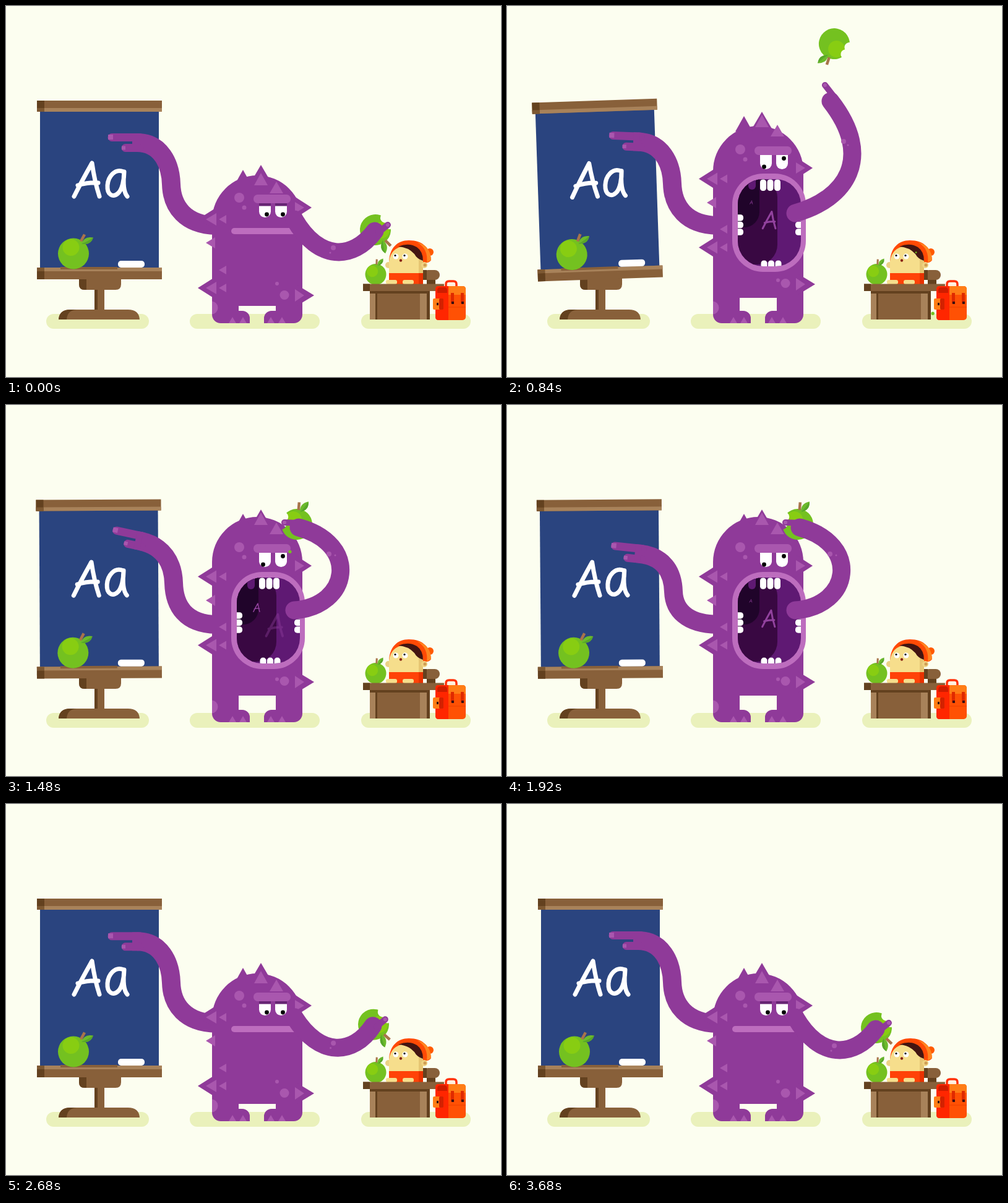
An HTML page for the animation above (3.72 s loop, 800 by 600 pixels).

```html
<!DOCTYPE html>
<html lang="en">
<head>
<meta charset="utf-8">
<title>Monster teacher</title>
<style>
html, body { margin: 0; width: 100%; height: 100%; overflow: hidden; background: #fcfef0; }
svg { display: block; width: 800px; height: 600px; }
.skin { fill: #8f3a99; }
.spot { fill: #a957ae; }
.limb { fill: none; stroke: #8f3a99; stroke-linecap: round; }
.glyph { fill: none; stroke-linecap: round; stroke-linejoin: round; }
.wood { fill: #88603a; }
.pale { fill: #a8825a; }
.dark { fill: #63411f; }
</style>
</head>
<body>
<svg viewBox="0 0 800 600">
<defs>
  <path id="A" class="glyph" d="M-21 27Q-8 1 8 -27Q12 2 20 27M-15 9Q2 4 18 5"/>
  <g id="fruit">
    <path d="M12 -20L18 -31" stroke="#a8744a" stroke-width="4.5"/>
    <path d="M13 -16Q17 -29 32 -26Q28 -13 13 -16Z" fill="#6cba2c"/>
    <path d="M13 -16Q22 -19 32 -26Q28 -13 13 -16Z" fill="#57a62a"/>
  </g>
  <g id="apple">
    <circle r="25" fill="#74c120"/>
    <circle cx="-4" cy="-10" r="13.5" fill="#88cd12"/>
    <use href="#fruit"/>
  </g>
  <mask id="bite">
    <rect x="-40" y="-40" width="80" height="80" fill="#fff"/>
    <circle cx="-23" cy="-10" r="8"/><circle cx="-15" cy="-20" r="8"/>
    <circle cx="-26" cy="-20" r="9"/>
  </mask>
  <clipPath id="gape"><rect id="hole" x="373" width="102"/></clipPath>
  <clipPath id="side"><rect x="333" y="470" width="20" height="40"/></clipPath>
</defs>

<g fill="#eaf1bb">
  <rect x="65" y="498" width="166" height="24" rx="12"/>
  <rect x="297" y="498" width="210" height="24" rx="12"/>
  <rect x="574" y="498" width="177" height="24" rx="12"/>
</g>

<!-- blackboard -->
<path class="wood" d="M118 440H186V450Q186 459 177 459H127Q118 459 118 450Z"/>
<path class="dark" d="M118 440H130V459H127Q118 459 118 450Z"/>
<rect class="wood" x="143" y="459" width="16" height="33"/>
<rect class="dark" x="143" y="459" width="5" height="33"/>
<path class="wood" d="M85 507Q86 491 104 491H197Q215 491 216 507Z"/>
<path class="dark" d="M85 507Q86 491 104 491H114Q99 492 98 507Z"/>
<g id="board">
  <rect x="55" y="168" width="192" height="257" fill="#2a447f"/>
  <rect class="wood" x="50" y="153" width="202" height="18"/>
  <rect class="pale" x="50" y="165" width="202" height="6"/>
  <path class="dark" d="M50 153H62V171H50Z"/>
  <path d="M50 165H62V171H50Z" fill="#7d5832"/>
  <rect class="wood" x="50" y="423" width="202" height="19"/>
  <rect class="pale" x="50" y="423" width="202" height="6"/>
  <path d="M50 423H62V429H50Z" fill="#7d5832"/>
  <path class="dark" d="M50 429H62V442H50Z"/>
  <rect class="wood" x="88" y="422" width="92" height="4"/>
  <rect x="181" y="412" width="43" height="11" rx="5" fill="#fff"/>
  <g stroke="#fff" stroke-width="7" aria-label="Aa">
    <use href="#A" x="131" y="281"/>
    <path class="glyph" d="M190 268C176 262 165 276 164 290C163 306 173 310 181 303C188 297 191 280 191 268C189 287 190 301 196 308"/>
  </g>
  <use id="shelf" href="#apple"/>
</g>

<!-- desk, pupil and bag -->
<path d="M680 440H694V455H680Z" class="dark"/>
<rect class="wood" x="674" y="427" width="27" height="16" rx="8"/>
<path class="dark" d="M674 427H680V443H674Z"/>
<circle cx="685" cy="398" r="6" fill="#ff5a00"/>
<path d="M619 416C619 391 633 379 651 379C674 379 686 392 687 411Q684 416 677 415Z" fill="#ff4a05"/>
<path d="M664 382C680 386 687 397 687 411L680 415C682 401 677 389 664 382Z" fill="#ff8620"/>
<circle cx="618" cy="419" r="5" fill="#ecd184"/>
<path d="M619 433V413Q622 391 644 388Q666 388 674 412V433Z" fill="#f6de8c"/>
<path d="M667 409H674V433H667Z" fill="#e6c673"/>
<path d="M634 389Q651 382 664 390Q674 397 674 412Q664 409 660 401Q650 390 634 389Z" fill="#431511"/>
<circle cx="676" cy="419" r="5" fill="#f0d382"/><circle cx="677" cy="419" r="2.5" fill="#cf9d55"/>
<g fill="#fff"><circle cx="630" cy="405" r="4.5"/><circle cx="645" cy="405" r="4.5"/></g>
<circle cx="629" cy="403.500" r="1.600"/><circle cx="644" cy="403.500" r="1.600"/>
<circle cx="638" cy="411.500" r="2.200" fill="#8a2415"/>
<path d="M619 432H674V450H619Z" fill="#ff4208"/>
<path d="M667 432H674V450H667Z" fill="#e93200"/>
<rect x="614" y="443" width="18" height="7" rx="3" fill="#f6de8c"/>
<rect x="641" y="443" width="18" height="7" rx="3" fill="#f6de8c"/>
<use href="#apple" transform="translate(597.500 434) rotate(-26) scale(.68)"/>
<path class="wood" d="M588 460H685V507H588Z"/>
<path class="pale" d="M588 460H597V507H588ZM669 460H680V507H669Z"/>
<path class="dark" d="M597 460H600V507H597ZM680 460H685V507H680ZM588 460H680V465H588Z"/>
<rect class="wood" x="577" y="449.500" width="131" height="11.500"/>
<rect class="dark" x="577" y="449.500" width="11" height="11.500"/>
<path d="M711 455V450Q711 445 716 445H723Q728 445 728 450V455" fill="#fff0e0" stroke="#ff3008" stroke-width="3.500"/>
<rect x="694" y="453" width="49" height="55" rx="5" fill="#ff5104"/>
<path d="M715 453H738Q743 453 743 458V467H715Z" fill="#ff7d16"/>
<path d="M699 453H715V508H699Q694 508 694 503V458Q694 453 699 453Z" fill="#ff2600"/>
<path d="M697 464V460Q697 455 702 455H708Q713 455 713 460V464Z" fill="#ce1d00"/>
<rect x="690" y="473" width="12" height="18" rx="2" fill="#ff7d16"/>
<rect x="700" y="473" width="7" height="18" rx="2" fill="#d32100"/>
<path d="M719 464H724V481H719ZM735 464H740V481H735Z" fill="#df2a00"/>
<path d="M720 478H724V482H720ZM736 478H740V482H736ZM696 480H699V484H696Z" fill="#3a1010"/>
<path d="M715 487H743" stroke="#f44400" stroke-width="1.500"/>

<!-- monster -->
<path id="armL" class="limb" stroke-width="30" style="stroke-linecap:butt"/>
<g id="handL">
  <path class="limb" stroke-width="13" d="M-41 -8.500H4M-19 8.500H4"/>
  <path class="limb" stroke-width="30" style="stroke-linecap:butt" d="M-8 0H2"/>
  <path class="spot" d="M-47 -13H-39V-5H-47ZM-25 5.500H-19V11.500H-25Z"/>
</g>
<path id="body" class="skin"/>
<g id="parts"></g>
<circle class="spot" cx="332" cy="488" r="10.500" clip-path="url(#side)"/>
<path class="spot" d="M360 513L366 503L372 513ZM377 513L383 503L389 513ZM422 513L428 503L434 513ZM440 513L446 503L452 513Z"/>
<rect id="lips" x="364" width="119" fill="#bd6dbe"/>
<g clip-path="url(#gape)">
  <rect x="364" y="160" width="119" height="300" fill="#5f1973"/>
  <rect id="throat" x="330" width="107" rx="32" fill="#390842"/>
  <rect id="gullet" x="330" width="78" rx="25" fill="#20042a"/>
  <rect id="uvula" x="390" width="12" height="40" rx="6" fill="#5f1973"/>
  <g id="shouts"></g>
  <g id="teeth" fill="#fff"></g>
</g>
<g id="held"><g mask="url(#bite)"><circle r="25" fill="#74c120"/><circle cx="-2" cy="-9" r="13.500" fill="#88cd12"/></g><use href="#fruit"/></g>
<path id="armR" class="limb" stroke-width="29"/>
<path id="finger" class="limb" stroke-width="10"/>
<circle id="nail" class="spot" r="3"/>
<circle id="dot1" class="spot" r="4"/>
<circle id="dot2" class="spot" r="1.500"/>
<g id="crumbs" fill="#74c120"></g>
</svg>
<script>
const LOOP = 3720, NS = 'http://www.w3.org/2000/svg';
const $ = id => document.getElementById(id);
const set = (el, attrs) => { for (const k in attrs) el.setAttribute(k, attrs[k]); return el; };
const add = (parent, tag, attrs) => set(parent.appendChild(document.createElementNS(NS, tag)), attrs);

// Monotone cubic through [time, values...] keys: smooth, without overshoot.
function track(keys, t) {
  let i = 0;
  while (i < keys.length - 2 && t >= keys[i + 1][0]) i++;
  const a = keys[i], b = keys[i + 1], h = b[0] - a[0], u = (t - a[0]) / h;
  const slope = (j, c) => j < 0 || j > keys.length - 2 ? 0 :
    (keys[j + 1][c] - keys[j][c]) / (keys[j + 1][0] - keys[j][0]);
  const tangent = (j, c) => {
    const l = slope(j - 1, c), r = slope(j, c);
    return l * r <= 0 ? 0 : 2 * l * r / (l + r);
  };
  return a.slice(1).map((p, n) => {
    const c = n + 1, q = b[c], m = tangent(i, c) * h, k = tangent(i + 1, c) * h;
    return p + u * (m + u * (3 * (q - p) - 2 * m - k + u * (2 * (p - q) + m + k)));
  });
}
const keyed = (poses, times) => times.map(([t, n]) => [t, ...poses[n]]);

// eyes, stretch, head top, crotch, mouth top, mouth bottom, lid, uvula
const bodyKeys = keyed([
  [319, 0, 274, 485, 359, 369, 4.5, 10],
  [299, 0.05, 250, 480, 336, 381, 0, 15],
  [241, 1, 194, 472, 271, 430, 0, 26],
  [239, 1, 181, 470, 270, 427, 0, 28],
  [260, 0.7, 205, 473, 293, 410, 0, 5]
], [[0, 0], [200, 0], [400, 1], [580, 2], [840, 2], [1480, 3], [2240, 3], [2360, 4], [2540, 0], [LOOP, 0]]);

// start y, two curve handles, hand, finger base, finger tip, two dots
const rightKeys = keyed([
  [345, 505, 412, 560, 412, 596, 364, 602, 366, 617, 354, 529, 391, 524, 399],
  [342, 525, 325, 600, 250, 543, 158, 549, 151, 540, 132, 552, 226, 558, 234],
  [335, 548, 312, 594, 245, 523, 154, 528, 146, 514, 128, 544, 219, 551, 225],
  [332, 556, 325, 572, 225, 473, 198, 473, 191, 450, 190, 522, 241, 532, 243],
  [335, 560, 325, 580, 245, 487, 199, 484, 190, 468, 180, 532, 250, 541, 252]
], [[0, 0], [100, 0], [400, 1], [840, 2], [1480, 3], [2200, 3], [2360, 4], [2720, 0], [LOOP, 0]]);

// elbow, wrist, tilt
const leftKeys = keyed([
  [267, 288, 212, 221, 0],
  [277, 290, 225, 218, 13],
  [267, 287, 212, 219.5, 2],
  [271, 288, 217, 220, 12],
  [267, 315, 212, 261, 0]
], [[0, 0], [100, 0], [400, 1], [840, 2], [1480, 3], [2360, 4], [2720, 0], [LOOP, 0]]);

const appleKeys = [
  [0, 597, 362, 106], [100, 597, 362, 106], [240, 592, 190, 65], [400, 565, 83, 18],
  [640, 546, 45, -85], [840, 529, 61, -190], [1140, 505, 128, -330], [1480, 470, 193, -384],
  [2200, 470, 193, -384], [2360, 487, 195, -372], [2720, 597, 362, -254], [LOOP, 597, 362, -254]
];

// Parts riding on the face: y = eyes + offset + stretch * gain.
const parts = [];
function part(offset, gain, tag, attrs, cls = 'spot') {
  const el = add($('parts'), tag, { class: cls, ...attrs });
  parts.push({ el, offset, gain });
  return el;
}
const tri = (x, w, h) => ({ d: `M${x} ${-h}L${x + w} 0V${h}Z`.replace(`L${x + w} 0V${h}`, `L${x + w} 0L${x} ${h}`) });
const peak = (x, w, h) => ({ d: `M${x} 0L${x + w} ${h}H${x - w}Z` });
part(-54, -9, 'path', peak(383, 14, 25), 'skin');
part(-62, -8, 'path', peak(412, 17, 29), 'skin');
part(-49, -16, 'path', peak(412, 11, 20));
part(-35, -14, 'path', peak(437, 11, 19));
part(7, 14, 'path', tri(466, 28, 18), 'skin');
part(7, 14, 'path', tri(467, 15, 9));
for (const y of [26, 137]) {
  part(y, 12.5, 'path', tri(340, -30, 19), 'skin');
  part(y, 12.5, 'path', tri(340, -17, 10));
  part(y, 12.5, 'path', tri(356, -12, 7));
}
part(64, 13, 'path', tri(338, -15, 9));
part(108, 12, 'path', tri(356, -12, 7));
part(-9, 0, 'circle', { cx: 377, r: 8 });
part(7, 0, 'circle', { cx: 385, r: 3.5 });
part(-14, 0, 'rect', { x: 400, width: 60, height: 14, rx: 6.5 });
for (const x of [409, 435]) {
  part(0, 0, 'path', { d: `M${x} 0h19v13.500a9.500 9.500 0 0 1 -19 0Z`, fill: '#fff' }, '');
}
const lids = part(0, 0, 'path', { fill: '#662473' }, '');
const pupilL = part(18, 1, 'circle', { r: 3.4 }, '');
part(18, -12.5, 'circle', { cx: 447.5, r: 3.4 }, '');

// Low parts follow the hips.
const spike = add($('parts'), 'g', {});
add(spike, 'path', { class: 'skin', ...tri(470, 28, 17) });
add(spike, 'path', { class: 'spot', ...tri(467, 15, 10) });
const mole = add($('parts'), 'circle', { class: 'spot', cx: 450, r: 7.5 });
const freckle = add($('parts'), 'circle', { class: 'spot', cx: 438, r: 3 });

const teeth = Array.from({ length: 12 }, () => add($('teeth'), 'rect', { rx: 4.5 }));
const shouts = Array.from({ length: 6 }, () =>
  add($('shouts'), 'use', { href: '#A', stroke: '#92429e', 'stroke-width': 6 }));

// Crumbs: start, end, reference time, place, speed, gravity, radius.
const crumbs = [
  { from: 260, to: 870, t: 400, x: 637, y: 317, vx: .116, vy: .1, g: .0007, r: 2.7 },
  { from: 260, to: 860, t: 400, x: 617, y: 243, vx: .1, vy: 0, g: .0008, r: 1.4 },
  { from: 1340, to: 1740, t: 1480, x: 459, y: 237, vx: -.03, vy: .3, g: .0007, r: 2.6 }
].map(c => ({ ...c, el: add($('crumbs'), 'circle', { r: c.r }) }));

function drawMouth(t, top, bottom, drop) {
  const h = bottom - top, inner = Math.max(0, h - 18);
  set($('lips'), { y: top, height: h, rx: Math.min(h / 2, 50) });
  set($('hole'), { y: top + 9, height: inner, rx: Math.min(inner / 2, 41) });
  set($('throat'), { y: top + 7, height: Math.max(0, h - 19) });
  set($('gullet'), { y: top - 60, height: Math.max(0, .95 * h - 4) });
  set($('uvula'), { y: top + drop - 40 });
  const d = h * .06, pitch = Math.min(11.5, inner * .27), mid = (top + bottom) / 2 + h * .025;
  teeth.forEach((el, i) => {
    const n = i % 3, row = i / 3 | 0;
    if (row < 2) {
      set(el, { x: 409 + row * 1.5 + n * 11.5, width: 10, height: 9 + d, y: row ? bottom - 9 - d : top + d });
    } else {
      set(el, { x: row == 2 ? 366 : 466, width: 16, height: Math.max(0, pitch - 1), y: mid + (n - 1.5) * pitch });
    }
  });
  shouts.forEach((el, i) => {
    const p = (t - 497 - i * 272) * .0021, live = p > 0 && p < 1;
    set(el, {
      opacity: live ? Math.min(1, (1 - p) * 3.5 + .12) : 0,
      transform: `translate(${387 + 51 * p} ${310 + 50 * p}) scale(${live ? p * .7 : 0})`
    });
  });
}

function drawBody(t) {
  const [eye, q, top, hip, m0, m1, lid, drop] = track(bodyKeys, t);
  set($('body'), {
    d: `M333 ${top + 73}A73 73 0 0 1 479 ${top + 73}V499a14 14 0 0 1 -14 14H417V505a12 12 0 0 1 12 -12H436` +
      `V${hip}H376V493H382a12 12 0 0 1 12 12V513H347a14 14 0 0 1 -14 -14Z`
  });
  for (const p of parts) set(p.el, { transform: `translate(0 ${eye + p.offset + p.gain * q})` });
  set(lids, { d: `M409 0h19v${lid}h-19ZM435 0h19v${lid}h-19Z` });
  set(pupilL, { cx: 421.5 - 6 * q });
  set(spike, { transform: `translate(0 ${hip - 17 - 5 * q})` });
  set(mole, { cy: hip - 17.5 - 6 * q });
  set(freckle, { cy: 449 - 5.5 * q });
  drawMouth(t, m0, m1, drop);
}

function drawArms(t) {
  const [y, ax, ay, bx, by, hx, hy, kx, ky, fx, fy, d1x, d1y, d2x, d2y] = track(rightKeys, t);
  set($('armR'), { d: `M466 ${y}C${ax} ${ay} ${bx} ${by} ${hx} ${hy}` });
  set($('finger'), { d: `M${kx} ${ky}L${fx} ${fy}` });
  set($('nail'), { cx: fx, cy: fy });
  set($('dot1'), { cx: d1x, cy: d1y });
  set($('dot2'), { cx: d2x, cy: d2y });

  const [ex, ey, wx, wy, a] = track(leftKeys, t), r = a * Math.PI / 180;
  set($('armL'), {
    d: `M340 355C290 354 ${ex + 1} ${ey + (355 - ey) * .55} ${ex} ${ey}` +
      `C${ex - 1} ${ey - 33} ${wx + 38 * Math.cos(r)} ${wy + 38 * Math.sin(r)} ${wx} ${wy}`
  });
  set($('handL'), { transform: `translate(${wx} ${wy}) rotate(${a})` });
}

function draw(t) {
  // The board rattles for as long as the shouting lasts.
  const tilt = t > 570 && t < 2290 ? -1.15 * (1 - Math.cos((t - 570) / 430 * 2 * Math.PI)) : 0;
  set($('board'), { transform: `rotate(${tilt} 151 442)` });
  set($('shelf'), { transform: `translate(${109 + tilt * 1.5} 400.500) rotate(${tilt * 3})` });
  drawBody(t);
  drawArms(t);
  const [x, y, a] = track(appleKeys, t);
  set($('held'), { transform: `translate(${x} ${y}) rotate(${a})` });
  for (const c of crumbs) {
    const dt = t - c.t;
    set(c.el, {
      cx: c.x + c.vx * dt, cy: c.y + c.vy * dt + c.g * dt * dt,
      opacity: t > c.from && t < c.to ? 1 : 0
    });
  }
}

const start = performance.now();
function frame() {
  draw((performance.now() - start) % LOOP);
  requestAnimationFrame(frame);
}
frame();
</script>
</body>
</html>
```
